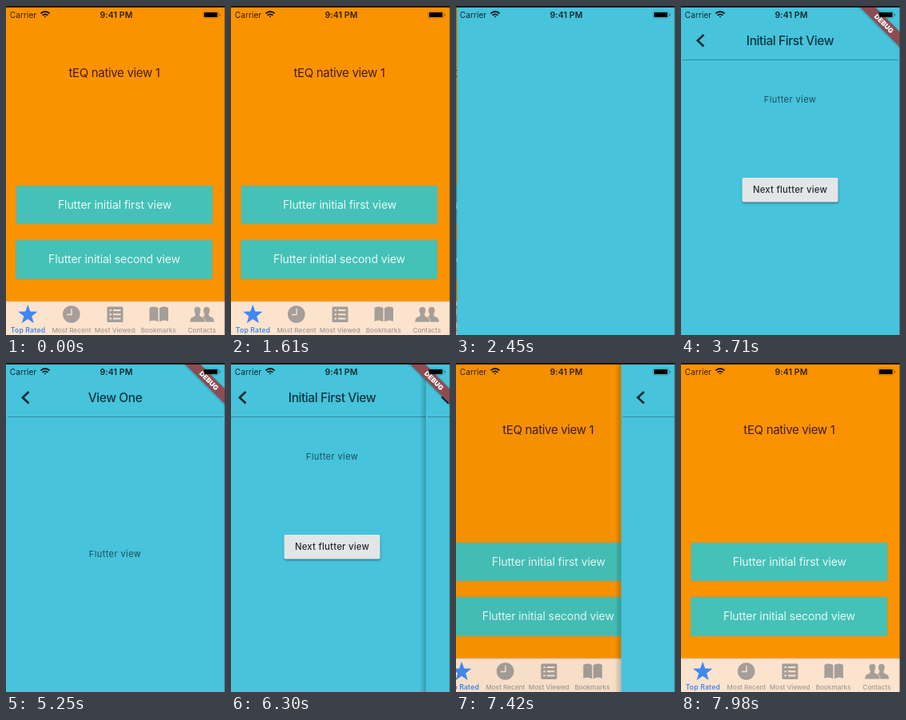
An HTML page for the animation above (8 s loop, 274 by 412 pixels).

```html
<!DOCTYPE html>
<html lang="en">
<head>
<meta charset="utf-8">
<title>Native and Flutter navigation</title>
<style>
  html, body { margin: 0; width: 100%; height: 100%; overflow: hidden; background: #fb9300; }
  svg { display: block; width: 100vw; height: 100vh; }
  text { font-family: Inter, Roboto, sans-serif; text-anchor: middle; }
  .head { font-size: 15px; letter-spacing: -.33px; fill: #471c1c; }
  .wide { font-size: 14px; letter-spacing: -.11px; fill: #e6fbf6; }
  .tab { font-size: 8.2px; font-weight: 500; fill: #a39b95; }
  .tab.on { font-size: 8.6px; font-weight: 600; letter-spacing: .2px; fill: #4488ee; }
  .title { font-size: 15.5px; font-weight: 500; letter-spacing: -.42px; fill: #0d3640; }
  .body { font-size: 11px; letter-spacing: .42px; fill: #1b4f5b; }
  .next { font-size: 11.3px; font-weight: 500; letter-spacing: .25px; fill: #26292b; }
  .debug { font-size: 8.5px; font-weight: 900; fill: #fff; }
  .status { font-size: 10px; letter-spacing: .1px; fill-opacity: .8; }
  .clock { font-size: 10.5px; font-weight: 600; }
</style>
</head>
<body>
<svg viewBox="0 0 274 412" preserveAspectRatio="none">
  <defs>
    <linearGradient id="edge">
      <stop offset="0" stop-color="#000" stop-opacity="0"/>
      <stop offset="1" stop-color="#000" stop-opacity=".2"/>
    </linearGradient>
    <filter id="soft" x="-20%" y="-100%" width="140%" height="300%">
      <feGaussianBlur stdDeviation="1.5"/>
    </filter>
  </defs>

  <g id="native">
    <rect width="274" height="412" fill="#fb9300"/>
    <text class="head" x="135.5" y="88.5">tEQ native view 1</text>
    <g fill="#45c1b8" stroke="#a5a55c" stroke-width="1.6">
      <rect x="12.7" y="225" width="245.8" height="48" rx="1"/>
      <rect x="12.2" y="293" width="246" height="49" rx="1"/>
    </g>
    <text class="wide" x="136" y="254">Flutter initial first view</text>
    <text class="wide" x="135.5" y="322">Flutter initial second view</text>
    <rect y="370" width="274" height="42" fill="#fce3cd"/>
    <rect y="369.5" width="274" height="1" fill="#dcb78c"/>
    <path id="star" fill="#3f88f2"/>
    <g fill="#a59e99">
      <circle cx="81.8" cy="386" r="10.8"/>
      <path d="M82 379v7.5h-6" fill="none" stroke="#fce3cd" stroke-width="1.4"/>
      <rect x="126.5" y="376.5" width="20" height="19.5" rx="1.5"/>
      <path d="M129.5 381h2.5m2 0h9.5M129.5 386.3h2.5m2 0h9.5M129.5 391.6h2.5m2 0h9.5" stroke="#fce3cd" stroke-width="2"/>
      <path d="M179.5 378q6-3 11 .3v17.2q-5-3-11-.5zM203 378q-6-3-11 .3v17.2q5-3 11-.5z"/>
      <g stroke="#fce3cd" stroke-width=".8">
        <path id="person" transform="translate(7.5 0)" d="M243.5 376.5c4.5 0 5 4.500 3.500 8-1 2-1 3.500 1.500 4.500 3.500 1.300 4.500 2.500 4.500 7h-19c0-4.500 1-5.700 4.500-7 2.500-1 2.500-2.500 1.500-4.500-1.500-3.500-1-8 3.500-8z"/>
        <use href="#person" x="-11.500"/>
      </g>
    </g>
    <g id="tabs"></g>
  </g>
  <rect id="dim" width="274" height="412"/>

  <g id="flutter">
    <rect x="-8" width="8" height="412" fill="url(#edge)"/>
    <rect width="274" height="412" fill="#47c3dc"/>
    <g id="content">
      <g id="first">
        <g class="bar"></g>
        <text class="title" x="136.5" y="49">Initial First View</text>
        <text class="body" x="136.5" y="121">Flutter view</text>
        <rect x="77" y="217" width="119.5" height="30" rx="2" opacity=".4" filter="url(#soft)"/>
        <rect x="76.5" y="215" width="120" height="30.5" rx="2" fill="#e3e6e7"/>
        <text class="next" x="136.5" y="234">Next flutter view</text>
      </g>
      <g id="second">
        <rect x="-8" width="8" height="412" fill="url(#edge)"/>
        <rect width="274" height="412" fill="#47c3dc"/>
        <g class="bar"></g>
        <text class="title" x="136.5" y="49">View One</text>
        <text class="body" x="136.5" y="243">Flutter view</text>
      </g>
      <g transform="translate(254 22) rotate(45)">
        <rect x="-44" y="-6" width="88" height="13" opacity=".4" filter="url(#soft)"/>
        <rect x="-44" y="-6.5" width="88" height="13" fill="#8e4c51"/>
        <text class="debug" y="3.1">DEBUG</text>
      </g>
    </g>
  </g>

  <g>
    <text class="status" x="21.5" y="14.5">Carrier</text>
    <g fill="none" stroke="#111" stroke-width="1.7">
      <path d="M43.3 9.3q5.700-4.600 11.400 0M45.5 11.7q3.500-2.800 7 0"/>
      <path d="M47.6 12.8h2.8l-1.4 1.7z" fill="#111" stroke="none"/>
    </g>
    <text class="status clock" x="138" y="14.5">9:41 PM</text>
    <rect x="246.5" y="6.8" width="19.5" height="8.4" rx="2" fill="none" stroke="#111" stroke-opacity=".25" stroke-width=".8"/>
    <rect x="247.8" y="8" width="16.8" height="6" rx="1"/>
    <rect x="267" y="9.5" width="1.2" height="3" rx=".6" opacity=".4"/>
    <rect width="274" height="1.8" fill="#1c0d0b"/>
    <rect x="273" width="1" height="412" fill="#3b2e20" opacity=".4"/>
  </g>
</svg>
<script>
const LOOP = 8000, W = 274;
const $ = id => document.getElementById(id);
const [native, dim, flutter, content, first, second] =
  ['native', 'dim', 'flutter', 'content', 'first', 'second'].map($);

$('star').setAttribute('d', 'M' + Array.from({ length: 10 }, (_, i) => {
  const r = i % 2 ? 5.2 : 12.8, a = i * Math.PI / 5;
  return `${(27.3 + r * Math.sin(a)).toFixed(2)} ${(386.8 - r * Math.cos(a)).toFixed(2)}`;
}).join('L') + 'z');

$('tabs').innerHTML = ['Top Rated', 'Most Recent', 'Most Viewed', 'Bookmarks', 'Contacts']
  .map((name, i) => `<text class="tab${i ? '' : ' on'}" x="${27.5 + i * 54.4}" y="408.5">${name}</text>`)
  .join('');

document.querySelectorAll('.bar').forEach(bar => {
  bar.innerHTML = `<path d="M28.5 36L20.8 43.2L28.5 50.5" fill="none" stroke="#0b2a33" stroke-width="2.6"/>
    <path d="M2 67.5H272" stroke="#2d8ca1"/>`;
});

const clamp = v => Math.min(1, Math.max(0, v));
const slide = (g, x) => g.setAttribute('transform', `translate(${x.toFixed(2)} 0)`);

// Critically damped spring of the native navigation, 0 to 1
function spring(ms) {
  const x = Math.max(0, ms) * 0.011;
  return 1 - (1 + x) * Math.exp(-x);
}

// Fast start and long settle of the Flutter page route
const route = ms => 1 - (1 - clamp(ms / 450)) ** 4;

function draw(t) {
  const shown = t < 7000 ? spring(t - 1780) : 1 - spring(t - 7174);
  slide(native, -0.3 * W * shown);
  dim.setAttribute('opacity', 0.1 * shown);
  slide(flutter, W * (1 - shown));
  flutter.style.display = W * shown < 0.5 ? 'none' : '';

  content.setAttribute('opacity', clamp((t - 2920) / 300));
  const pushed = t < 6000 ? route(t - 4560) : 1 - route(t - 6110);
  slide(first, -W / 3 * pushed);
  slide(second, W * (1 - pushed));
  second.style.display = pushed > 0 ? '' : 'none';
}

const start = performance.now();
function tick() {
  draw((performance.now() - start) % LOOP);
  requestAnimationFrame(tick);
}
tick();
</script>
</body>
</html>
```
